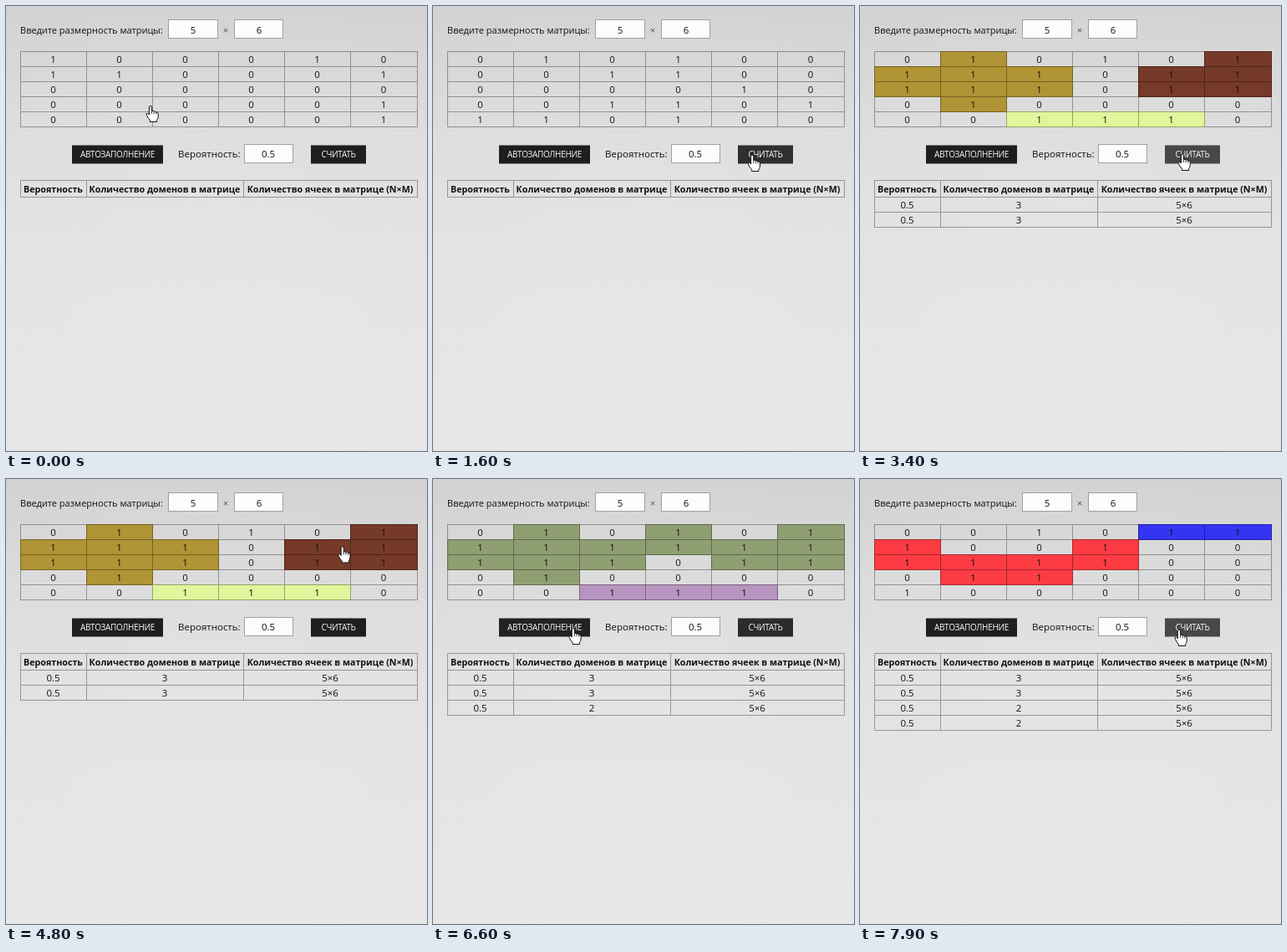
These frames come from a looping animation (504x532 px, 8000 ms). An HTML page:

```html
<!DOCTYPE html>
<html lang="ru">
<head>
<meta charset="utf-8">
<title>Домены в матрице</title>
<style>
html, body { margin: 0; width: 100%; height: 100%; overflow: hidden; }
body {
  background:
    radial-gradient(ellipse 420px 560px at 50% 88%, rgba(255,255,255,.1), rgba(255,255,255,0)),
    linear-gradient(#d2d2d2, #dbdbdb 22%, #e1e1e1 45%, #e4e4e4 70%, #e5e5e5);
}
svg { display: block; width: 504px; height: 532px; }
text { font: 11.5px "Trebuchet MS", "Open Sans", sans-serif; fill: #111; }
.mid { text-anchor: middle; }
.num { font-weight: 500; }
.title { font-size: 11px; }
.head { font-weight: 700; font-size: 10.7px; }
.btn { font-size: 10px; font-weight: 500; letter-spacing: -.3px; fill: #f8f8f8; }
.line { fill: none; stroke: rgba(0,0,0,.34); shape-rendering: crispEdges; }
.input { fill: #fcfcfc; stroke: #a0a0a0; shape-rendering: crispEdges; }
</style>
</head>
<body>
<svg id="stage" viewBox="0 0 504 532">
  <text class="title" x="17" y="33">Введите размерность матрицы:</text>
  <rect class="input" x="194.5" y="16.5" width="59" height="22"/>
  <text class="mid num" x="224" y="33">5</text>
  <text class="mid" x="263" y="33" style="fill:#555">×</text>
  <rect class="input" x="273.5" y="16.5" width="58" height="22"/>
  <text class="mid num" x="303" y="33">6</text>

  <g id="matrix"></g>

  <rect id="fill" x="79" y="166.5" width="109" height="22"/>
  <text class="btn mid" x="133.5" y="181">АВТОЗАПОЛНЕНИЕ</text>
  <text x="206" y="181">Вероятность:</text>
  <rect class="input" x="285.5" y="165.5" width="58" height="22"/>
  <text class="mid num" x="314" y="181">0.5</text>
  <rect id="count" x="365" y="166.5" width="66" height="22"/>
  <text class="btn mid" x="398" y="181">СЧИТАТЬ</text>

  <g id="results"></g>

  <g id="cursor">
    <g id="hand" stroke="#111" stroke-linejoin="round" transform="translate(-1 -1)">
      <path fill="#fff" d="M-1.6 1.2Q0-.6 1.6 1.2V6.6Q3.4 5.6 4.2 7.2Q6 6.4 6.8 8Q9 7.4 9.3 9.8V13Q9 16 7.6 17.4V19.5H-.6V17.6Q-3 15-4.8 11.2Q-5.6 9-3.4 9.2L-1.6 11Z"/>
      <path fill="none" stroke-width=".8" d="M1.6 6.6V10M4.2 7.2V10.3M6.8 8V10.6"/>
    </g>
    <path id="beam" fill="none" stroke="#222" stroke-width="1.2" transform="translate(.5 .5)" d="M-3-6.5Q0-6.5 0-5Q0-6.5 3-6.5M0-5V5M-3 6.5Q0 6.5 0 5Q0 6.5 3 6.5"/>
    <path id="arrow" fill="#fff" stroke="#111" stroke-linejoin="round" d="M0 0V15.5L3.6 12.2L6 17.6L8.3 16.6L6 11.4H11Z"/>
  </g>
</svg>
<script>
const LOOP = 8000, FADE = 400, STEP = 20, COLS = 6, ROWS = 5;
const $ = id => document.getElementById(id);

function add(parent, tag, attrs, text) {
  const el = document.createElementNS("http://www.w3.org/2000/svg", tag);
  for (const k in attrs) el.setAttribute(k, attrs[k]);
  if (text !== undefined) el.textContent = text;
  parent.append(el);
  return el;
}

// Matrices are rows of digits; tints go to the domains in reading order.
const first = "100010 110001 000000 000001 000001";
const second = "010100 001100 000010 001101 110100";
const third = "010101 111011 111011 010000 001110";
const joined = "010101 111111 111011 010000 001110";
const fourth = "001011 100100 111100 011000 100000";
const scenes = [
  { at: 0, cells: first },
  { at: 950, cells: second },
  { at: 1650, cells: second, tints: ["none", "#b17b4b", "#e28413"] },
  { at: 2380, cells: third },
  { at: 3180, cells: third, tints: ["#b09435", "#763a28", "#e1f59b"] },
  { at: 5080, cells: joined, from: third, tints: ["#b09435", "#763a28", "#e1f59b"] },
  { at: 6080, cells: joined, tints: ["#8f9f72", "#b795c0"] },
  { at: 6820, cells: fourth },
  { at: 7680, cells: fourth, tints: ["#3434f3", "#fc3b43"] }
];
const results = [[1650, 3], [3180, 3], [6080, 2], [7680, 2]];

// Pointer hot spot: [time, x, y], eased between stops.
const path = [
  [0, 174, 120], [80, 174, 120], [520, 146, 178], [800, 144, 179], [1000, 145, 179],
  [1550, 383, 179], [1750, 384, 179], [2110, 171, 181], [2200, 171, 181],
  [2360, 152, 180], [2550, 152, 180], [3060, 385, 179], [3400, 387, 178],
  [3650, 387, 178], [4250, 436, 82], [4700, 437, 82], [5020, 296, 80],
  [5220, 296, 80], [5800, 427, 180], [5900, 427, 180], [6050, 412, 180],
  [6200, 410, 180], [6680, 150, 179], [6980, 150, 179], [7580, 380, 181],
  [7900, 383, 181], [LOOP, 383, 181]
];

function paint(cells, tints = []) {
  const on = cells.replace(/ /g, ""), out = Array(on.length).fill("none"), seen = new Set();
  let domain = 0;
  for (let i = 0; i < on.length; i++) {
    if (on[i] === "0" || seen.has(i)) continue;
    const group = [i];
    seen.add(i);
    for (const c of group) {
      const x = c % COLS;
      const near = [c - COLS, c + COLS, x > 0 ? c - 1 : -1, x < COLS - 1 ? c + 1 : -1];
      for (const n of near)
        if (on[n] === "1" && !seen.has(n)) { seen.add(n); group.push(n); }
    }
    if (group.length < 2) continue;
    for (const c of group) out[c] = tints[domain] || "none";
    domain++;
  }
  return out;
}
for (const s of scenes) {
  s.digits = s.cells.replace(/ /g, "");
  s.paint = paint(s.from || s.cells, s.tints);
}

const colX = i => 17 + Math.floor(i * 79.17);
const cells = [], rows = [];
for (let i = 0; i < ROWS * COLS; i++) {
  const c = i % COLS, y = 54 + 18 * Math.floor(i / COLS), x = colX(c), w = colX(c + 1) - x;
  cells.push({
    box: add($("matrix"), "rect", { x, y, width: w + 1, height: 19 }),
    label: add($("matrix"), "text", { class: "mid num", x: x + w / 2, y: y + 14 })
  });
}
// Labels are lifted above the tints of neighbouring cells.
for (const c of cells) $("matrix").append(c.label);
let grid = "";
for (let i = 0; i <= ROWS; i++) grid += `M17 ${54.5 + 18 * i}H493`;
for (let i = 0; i <= COLS; i++) grid += `M${colX(i) + .5} 54V145`;
add($("matrix"), "path", { class: "line", d: grid });

function tableRow(y, h, texts, cls) {
  const g = add($("results"), "g", {}), edges = [17, 96, 284, 492];
  add(g, "path", {
    class: "line",
    d: `M17 ${y + h + .5}H493` + edges.map(x => `M${x + .5} ${y + 1}V${y + h}`).join("")
  });
  texts.forEach((t, i) =>
    add(g, "text", { class: cls, x: (edges[i] + edges[i + 1]) / 2, y: y + h / 2 + 5 }, t));
  return g;
}
add($("results"), "path", { class: "line", d: "M17 208.5H493" });
tableRow(208, 20, ["Вероятность", "Количество доменов в матрице", "Количество ячеек в матрице (N×M)"], "head mid");
results.forEach(([at, n], i) =>
  rows.push({ at, el: tableRow(228 + i * 18, 18, ["0.5", n, "5×6"], "mid num") }));

function pointer(t) {
  let i = 1;
  while (i < path.length - 1 && path[i][0] < t) i++;
  const [t0, x0, y0] = path[i - 1], [t1, x1, y1] = path[i];
  const u = Math.min(1, (t - t0) / (t1 - t0)), s = u * u * (3 - 2 * u);
  return [x0 + (x1 - x0) * s, y0 + (y1 - y0) * s];
}

const inside = ([x, y], l, t, r, b) => x >= l && x <= r && y >= t && y <= b;
const overFill = p => inside(p, 79, 166, 188, 188);
const overCount = p => inside(p, 365, 166, 431, 188);
function shape(p) {
  if (overFill(p) || overCount(p) || inside(p, 17, 54, 492, 144)) return "hand";
  return inside(p, 206, 170, 277, 186) || inside(p, 285, 165, 343, 188) ? "beam" : "arrow";
}

// Hover brightness sampled over the whole loop.
function hoverTrack(over) {
  const track = [];
  let level = 0;
  for (let t = 0; t <= LOOP; t += STEP) {
    level += (over(pointer(t)) ? 1 : -1) * STEP / FADE;
    track.push(level = Math.max(0, Math.min(1, level)));
  }
  return track;
}
const tracks = { fill: hoverTrack(overFill), count: hoverTrack(overCount) };

let shown;
function draw(t) {
  const scene = scenes.filter(s => s.at <= t).pop();
  if (scene !== shown) {
    shown = scene;
    cells.forEach((c, i) => {
      c.box.setAttribute("fill", scene.paint[i]);
      c.label.textContent = scene.digits[i];
    });
  }
  for (const r of rows) r.el.style.display = t >= r.at ? "" : "none";
  for (const id in tracks) {
    const v = Math.round(30 + 42 * tracks[id][Math.floor(t / STEP)]);
    $(id).setAttribute("fill", `rgb(${v},${v},${v})`);
  }
  const p = pointer(t), kind = shape(p);
  $("cursor").setAttribute("transform", `translate(${p[0].toFixed(1)} ${p[1].toFixed(1)})`);
  for (const id of ["hand", "beam", "arrow"]) $(id).style.display = id === kind ? "" : "none";
}

const start = performance.now();
function tick() {
  draw((performance.now() - start) % LOOP);
  requestAnimationFrame(tick);
}
tick();
</script>
</body>
</html>
```
